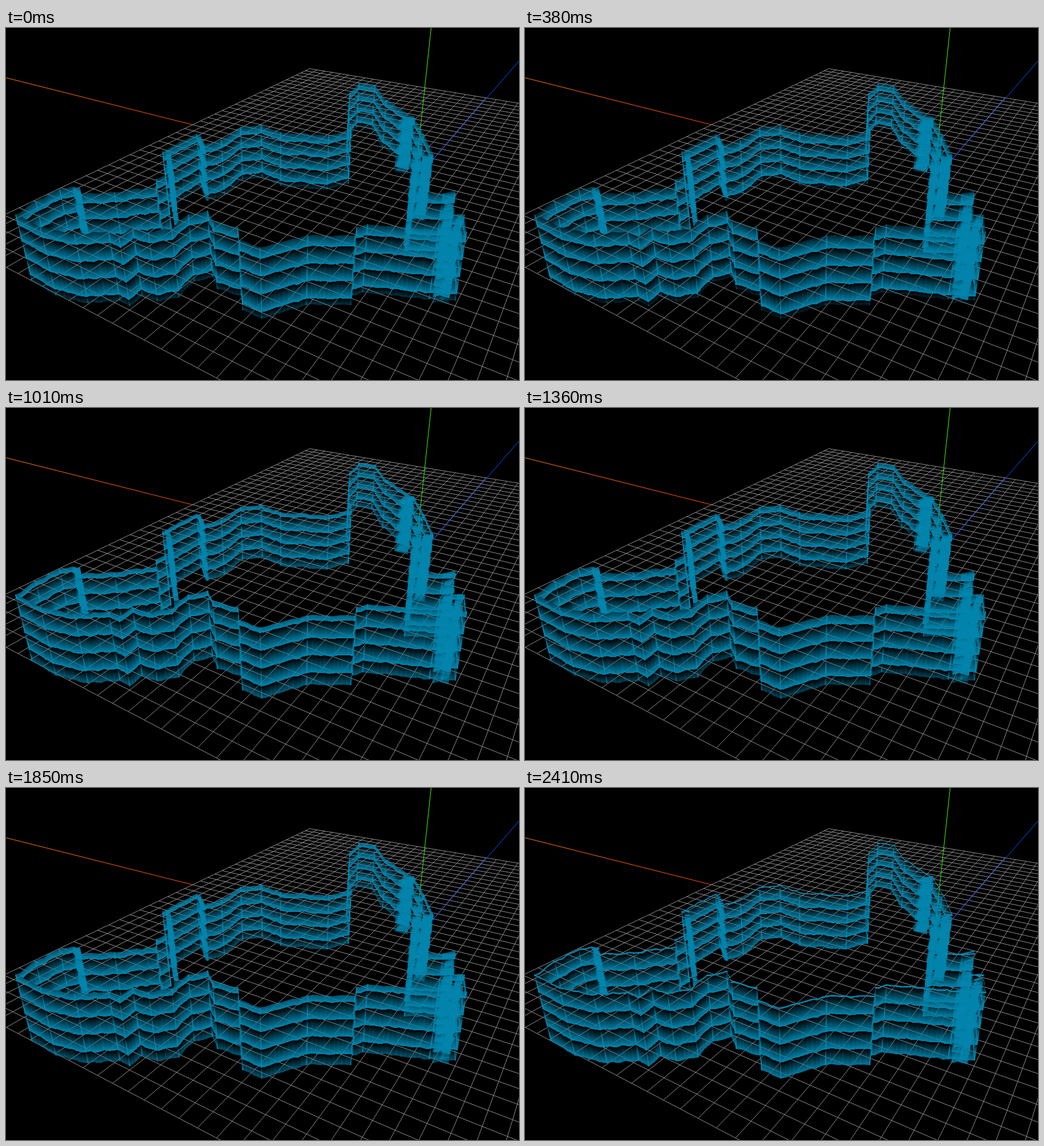
An HTML page with a canvas for the animation above (2480 ms loop, 901 by 619 pixels).

```html
<!DOCTYPE html>
<html lang="en">
<head>
<meta charset="utf-8">
<title>Scrolling wall</title>
<style>
  html, body { margin: 0; width: 100%; height: 100%; overflow: hidden; background: #000; }
  canvas { display: block; }
</style>
</head>
<body>
<canvas id="stage" width="901" height="619"></canvas>
<script>
const ctx = document.getElementById('stage').getContext('2d');
const W = 901, H = 619, LOOP = 2480;
const BANDS = 4, SPEED = 2.3, START = 0.64, WALL_RGB = '2,132,172';

// Perspective: ground origin, vanishing points and their weights
const ORIGIN = [718, 268.5], VP_U = [-1212, -218], VP_V = [1133, -216], VP_DOWN = [495, 2250];
const WU = 0.2535, WV = 0.43, WH = -0.0447;
const HORIZON = -217, DEPTH = ORIGIN[1] - HORIZON;

function ground(u, v) {
  const w = 1 + WU * u + WV * v;
  return ORIGIN.map((o, i) => (o + WU * u * VP_U[i] + WV * v * VP_V[i]) / w);
}

// Foot of the wall on the ground below a point of its top edge
function foot([x, y]) {
  const w = (DEPTH + WH * (VP_DOWN[1] - y)) / (y - HORIZON);
  return [x, y].map((c, i) => (c * (w + WH) - WH * VP_DOWN[i]) / w);
}

let seed = 7;
function jitter(size) {
  seed = (seed * 16807) % 2147483647;
  return (seed / 2147483647 * 2 - 1) * size;
}

const mix = (a, b, t) => a.map((c, i) => c + (b[i] - c) * t);

// Corners of the top edge, as seen on the stage
const back = [
  [17, 328], [52, 304], [94, 283], [121, 280], [127, 291], [190, 289], [263, 279], [264, 266],
  [280, 258], [275, 217], [335, 186], [346, 206], [378, 196], [412, 174], [448, 170], [482, 183],
  [567, 189], [606, 180]
];
const right = [
  [606, 180], [602, 140], [604, 113], [620, 97], [648, 100], [668, 126], [717, 157], [733, 186],
  [750, 222], [722, 240], [712, 290], [768, 291], [789, 290], [782, 328], [805, 328], [809, 358],
  [760, 356]
];
const front = [
  [760, 356], [635, 345], [616, 350], [613, 365], [530, 365], [446, 386], [410, 373], [407, 350],
  [363, 340], [354, 321], [320, 328], [291, 353], [250, 359], [222, 350], [198, 367], [180, 358],
  [120, 362], [60, 350], [17, 328]
];

// Stretches seen edge-on: start, end, width
const farPillars = [
  [[123, 280], [126, 290], 11], [[339, 187], [346, 205], 7], [[284, 216], [290, 250], 8]
];
const nearPillars = [
  [[708, 156], [703, 164], 20], [[726, 190], [714, 282], 13], [[741, 222], [738, 236], 16],
  [[779, 288], [776, 360], 17], [[798, 328], [788, 362], 13]
];

// Split the edge into short, slightly uneven steps
function roughen(path) {
  const out = [path[0]];
  for (let i = 1; i < path.length; i++) {
    const a = path[i - 1], b = path[i];
    const n = Math.ceil(Math.hypot(b[0] - a[0], b[1] - a[1]) / 9);
    for (let k = 1; k <= n; k++) {
      const [x, y] = mix(a, b, k / n);
      out.push(k < n ? [x + jitter(1), y + jitter(1.6)] : b);
    }
  }
  return out;
}

// Matrix that maps the unit square onto the wall between two top points
function panel(p, q) {
  const down = mix(foot(p), foot(q), 0.5).map((c, i) => c - (p[i] + q[i]) / 2);
  return {
    matrix: [q[0] - p[0], q[1] - p[1], ...down, ...p],
    width: 1 + 0.2 / Math.max(1, Math.abs(q[0] - p[0]))
  };
}

const wall = edge => edge.slice(1).map((q, i) => panel(edge[i], q));

function pillar([a, b, width], layers = 6) {
  return Array.from({ length: layers }, (_, i) => {
    const [x, y] = mix(a, b, i / (layers - 1));
    const half = width / 2 + jitter(width / 8), tilt = jitter(width / 6);
    return panel([x - half, y - tilt], [x + half, y + tilt]);
  });
}

const crease = p => pillar([p, p, 2], 2);

const frontEdge = roughen(front);
const farPanels = [...wall(roughen(back)), ...back.flatMap(crease), ...farPillars.flatMap(p => pillar(p))];
const nearPanels = [
  ...wall(roughen(right)), ...right.flatMap(crease), ...nearPillars.flatMap(p => pillar(p)),
  ...wall(frontEdge), ...front.flatMap(crease)
];

// Everything but the front wall, which hides what lies behind it
const behind = new Path2D();
behind.rect(0, 0, W, H);
[...frontEdge, ...frontEdge.map(foot).reverse()].forEach((p, i) => {
  if (i) behind.lineTo(...p);
  else behind.moveTo(...p);
});
behind.closePath();

function line(a, b, style) {
  ctx.strokeStyle = style;
  ctx.beginPath();
  ctx.moveTo(...a);
  ctx.lineTo(...b);
  ctx.stroke();
}

function fade(a, b, from, to) {
  const g = ctx.createLinearGradient(...a, ...b);
  g.addColorStop(0, from);
  g.addColorStop(1, to);
  line(a, b, g);
}

function drawFloor() {
  for (let i = -20; i <= 20; i++) {
    const s = i / 20;
    line(ground(s, -1), ground(s, 1), '#909090');
    line(ground(-1, s), ground(1, s), '#909090');
  }
  fade([0, 87.5], ground(1, 0), '#ff8000', '#ff5000');
  fade([746.7, 0], ORIGIN, '#48ff00', '#20ff00');
  fade([901, 58], ORIGIN, '#0068ff', '#0018ff');
}

function bandFill(phase) {
  const g = ctx.createLinearGradient(0, 0, 0, 1);
  for (let k = 0; k <= BANDS; k++) {
    const top = (k - 1 + phase) / BANDS;
    for (const v of [Math.max(top, 0), Math.min(top + 1 / BANDS, 1)]) {
      g.addColorStop(v, `rgba(${WALL_RGB},${((v - top) * BANDS).toFixed(3)})`);
    }
  }
  return g;
}

function drawPanels(panels) {
  for (const { matrix, width } of panels) {
    ctx.setTransform(...matrix);
    ctx.fillRect(0, 0, width, 1);
  }
}

function draw(ms) {
  const p = START - SPEED * ms / 1000;
  ctx.resetTransform();
  ctx.fillStyle = '#000';
  ctx.fillRect(0, 0, W, H);
  drawFloor();
  ctx.fillStyle = bandFill(p - Math.floor(p));
  ctx.save();
  ctx.clip(behind, 'evenodd');
  drawPanels(farPanels);
  ctx.restore();
  drawPanels(nearPanels);
}

// The picture advances every 70 ms, with one short step before 310 ms
function step(t) {
  const base = t < 310 ? 0 : 310;
  return base + Math.floor((t - base) / 70) * 70;
}

const began = performance.now();
let shown = -1;
function tick() {
  const now = step((performance.now() - began) % LOOP);
  if (now !== shown) draw(shown = now);
  requestAnimationFrame(tick);
}
tick();
</script>
</body>
</html>
```
